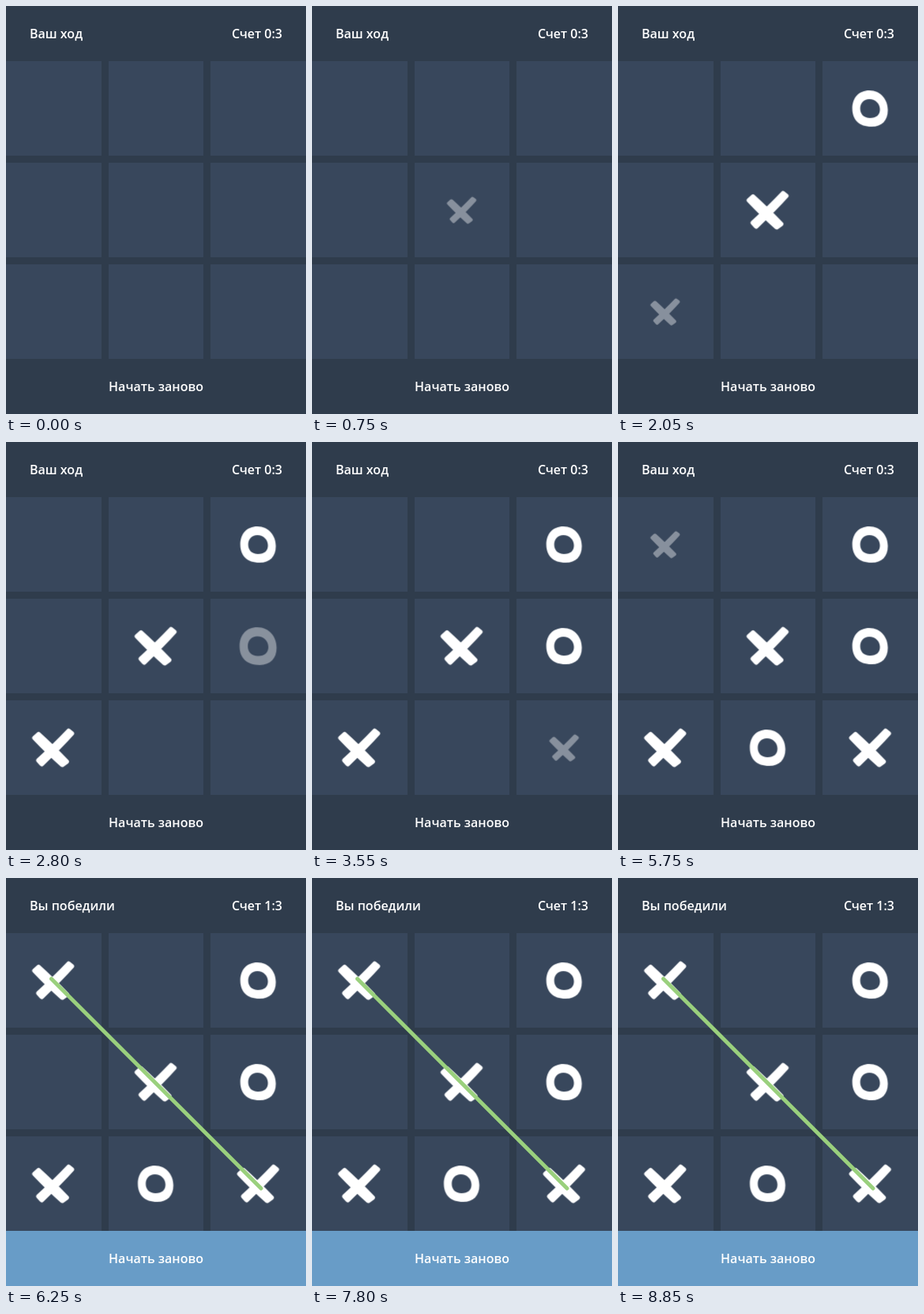
An HTML page for the animation above (9.25 s loop, 380x518 px).

```html
<!DOCTYPE html>
<html lang="ru">
<head>
<meta charset="utf-8">
<title>Крестики-нолики</title>
<style>
  html, body { margin: 0; width: 100%; height: 100%; overflow: hidden; background: #2f3c4c; }
  svg { display: block; width: 380px; height: 518px; }
  text { font: 600 16px "Open Sans", "Noto Sans", sans-serif; fill: #fff; }
  .cell { fill: #38475c; }
  .cross { fill: #fff; stroke: #fff; stroke-width: 6; stroke-linejoin: round; }
  .nought { fill: #fff; fill-rule: evenodd; }
  .strike { stroke: #9ad07d; stroke-width: 5; stroke-linecap: round; }
</style>
</head>
<body>
<svg id="stage" viewBox="0 0 380 518"></svg>
<script>
const LOOP = 9250;
const WIN = 6150;
const stage = document.getElementById('stage');

const CROSS = 'M19.5-21.3L23.5-18.2Q10-3-14.5 20.5L-18.5 16Q3-4 19.5-21.3Z' +
  'M-23.5-12.5L-18.5-17Q-3-3 17 17.5L11.5 21.5Q-4 8-23.5-12.5Z';
const NOUGHT = 'M-1-23C14-23 22.5-11 22.5 2C22.5 15 15 23 2 23C-14 23-22.5 14-22.5 0C-22.5-14-14-23-1-23Z' +
  'M-1-12C7-12 12.5-6 12.5 1C12.5 8 8 12 0 12C-8 12-12.5 7-12.5 0C-12.5-7-8-12-1-12Z';

function add(tag, attrs, parent = stage, content = '') {
  const el = document.createElementNS('http://www.w3.org/2000/svg', tag);
  for (const key in attrs) el.setAttribute(key, attrs[key]);
  el.textContent = content;
  return parent.appendChild(el);
}

// Steps are [time, properties]; the first and last states are held to the loop's ends.
function play(el, steps, easing = 'linear') {
  const frames = steps.map(([time, props]) => ({ offset: time / LOOP, easing, ...props }));
  frames.unshift({ ...frames[0], offset: 0 });
  frames.push({ ...frames[frames.length - 1], offset: 1 });
  el.animate(frames, { duration: LOOP, iterations: Infinity });
}

function showDuring(el, spans) {
  const steps = [[0, { opacity: 0 }]];
  for (const [from, to] of spans) steps.push([from, { opacity: 1 }], [to, { opacity: 0 }]);
  play(el, steps, 'steps(1, end)');
}

function mark(shape, col, row, poses) {
  const cell = add('g', { transform: `translate(${59.7 + 129.8 * col} ${130.2 + 129 * row})` });
  const path = add('path', { d: shape, class: shape === CROSS ? 'cross' : 'nought' }, cell);
  play(path, poses.map(([time, scale, opacity]) =>
    [time, { transform: `scale(${scale})`, opacity }]));
}

const hoverIn = t => [[t, 1, 0], [t + 200, .7, .4]];
const press = (t, span = 200) =>
  [[t - 1, .7, .4], [t, .8, .55], [t + span * .45, 1.2, 1], [t + span, 1, 1]];
const reply = t => [[t - 1, 1, 0], [t, 1.04, .4], [t + 90, 1.2, 1], [t + 200, 1, 1]];

for (const y of [70, 199, 328])
  for (const [x, width] of [[0, 121], [130, 120], [259, 121]])
    add('rect', { class: 'cell', x, y, width, height: 120 });

const button = add('rect', { y: 448, width: 380, height: 70, fill: '#689cc7' });
play(button, [[WIN - 1, { opacity: 0 }], [WIN, { opacity: .4 }], [WIN + 100, { opacity: 1 }]]);
add('text', { x: 190, y: 489, 'text-anchor': 'middle' }, stage, 'Начать заново');

const turns = [[850, 1400], [2250, 2800], [4250, 4750]];
const label = (content, spans, attrs = { x: 30 }) =>
  showDuring(add('text', { y: 41, ...attrs }, stage, content), spans);
const right = { x: 350, 'text-anchor': 'end' };
label('Ваш ход', [[0, 850], [1400, 2250], [2800, 4250], [4750, WIN]]);
label('Мой ход', turns);
label('Вы победили', [[WIN, LOOP]]);
label('Счет 0:3', [[0, WIN]], right);
label('Счет 1:3', [[WIN, LOOP]], right);

// Cells the pointer only passes over
mark(CROSS, 0, 1, [[399, 1, 0], [400, .77, .25], [549, .77, .25], [660, 1, 0]]);
mark(CROSS, 1, 2, [[3150, 1, 0], [3280, .8, .25], [3420, 1, 0]]);

mark(CROSS, 1, 1, [...hoverIn(550), ...press(850)]);
mark(NOUGHT, 2, 0, reply(1400));
mark(CROSS, 0, 2, [[1849, 1, 0], [1850, .88, .12], [1980, .88, .12], [2050, .7, .4], ...press(2250)]);
mark(NOUGHT, 2, 1, reply(2800));
mark(CROSS, 2, 2, [...hoverIn(3350), ...press(4250)]);
mark(NOUGHT, 1, 2, reply(4750));
mark(CROSS, 0, 0, [...hoverIn(5550), ...press(WIN, 100)]);

const strike = add('line', { class: 'strike', x1: 57.5, y1: 128, x2: 323, y2: 394, pathLength: 1, 'stroke-dasharray': '1 2' });
play(strike, [
  [WIN - 1, { opacity: 0, strokeDashoffset: 1 }],
  [WIN, { opacity: 1, strokeDashoffset: .9 }],
  [WIN + 95, { opacity: 1, strokeDashoffset: 0 }]
]);
</script>
</body>
</html>
```
